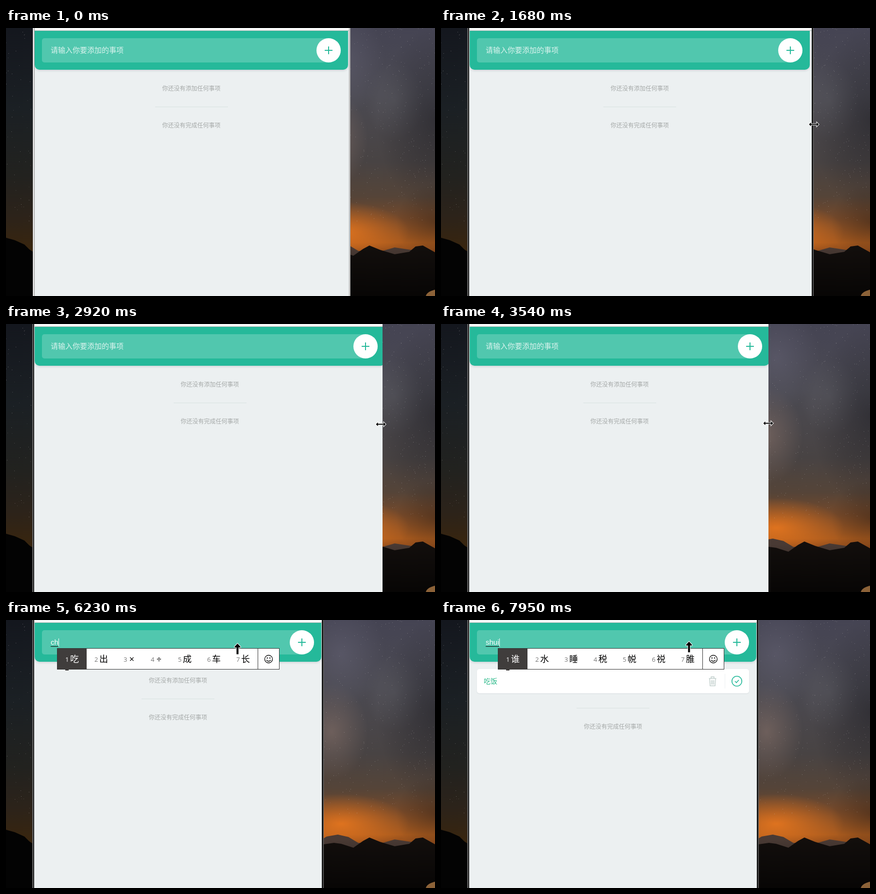
An HTML page with a canvas for the animation above (8 s loop, 883x552 px).

```html
<!DOCTYPE html>
<html lang="zh-CN">
<head>
<meta charset="utf-8">
<style>
html, body { margin: 0; width: 100%; height: 100%; overflow: hidden; background: #000; }
body { font-family: 'Liberation Sans', 'Noto Sans CJK SC', 'Noto Sans CJK', sans-serif; }
body *, #tail::after { position: absolute; box-sizing: border-box; }
svg * { position: static; }
svg { fill: none; overflow: visible; }
#left { left: 54px; top: 0; width: 5px; height: 552px; }
#right { top: 0; width: 4px; height: 552px; background: linear-gradient(90deg, #191919 3px, #727272 3px); }
.idle #right { background: linear-gradient(90deg, #999 1px, #f0f0f0 1px 2px, #8a8a8a 2px 3px, transparent 3px); }
#left { background: linear-gradient(90deg, #555 1px, #777 1px 2px, #191919 2px 4px, #ecf0f1 4px); }
.idle #left { background: linear-gradient(90deg, transparent 1px, #aaa 1px 2px, #f0f0f0 2px 4px, #8a8a8a 4px); }
#win { left: 59px; top: 0; height: 552px; overflow: hidden; background: #ecf0f1; }
#strip { left: 0; top: 0; width: 100%; height: 6px; background: #f6f7f7; border-bottom: 1px solid #9fb5af; }
#page { left: 0; top: 0; height: 552px; }
#head { top: 6px; width: 100%; height: 80px; background: #25b99a; border-radius: 0 0 10px 10px; box-shadow: 0 2px 4px rgba(44,62,80,.15); }
#field { left: 15px; right: 15px; top: 15px; height: 50px; border-radius: 5px 25px 25px 5px; background: rgba(255,255,255,.2); }
#add { right: 0; top: 0; width: 50px; height: 50px; border-radius: 50%; background: #fff; }
#hint, #typed { left: 18px; font-size: 15px; line-height: 50px; white-space: pre; color: #fff; }
#hint { opacity: .8; }
#line { left: 18px; top: 33px; height: 1px; background: #000; }
#caret { top: 17px; width: 1px; height: 17px; background: #fff; }
.note { width: 100%; text-align: center; font-size: 12px; line-height: 20px; color: #a5a9a8; }
#none { top: 115px; }
#tail { top: 162px; width: 100%; }
#tail::after { content: ''; left: 50%; top: 0; width: 150px; height: 1px; margin-left: -75px; background: #d8e1e0; }
#tail .note { top: 29px; }
#item { left: 15px; right: 15px; top: 101px; height: 50px; padding-left: 14px; border-radius: 5px; background: #fff; box-shadow: 0 1px 2px rgba(44,62,80,.1); font-size: 14px; line-height: 50px; color: #28b888; }
#item svg { right: 0; top: 0; }
#ime { top: 58px; height: 44px; display: flex; border: 1px solid #333; background: #fff; font-family: 'Open Sans', 'Noto Sans CJK SC', 'Noto Sans CJK', sans-serif; line-height: 43px; color: #000; }
#ime > * { position: relative; flex: none; height: 42px; }
#ime i { left: 16px; font: 13px/45px 'Open Sans', sans-serif; color: #777; }
#ime b { left: 26px; right: 16px; text-align: center; font-size: 18px; font-weight: 400; white-space: nowrap; }
#ime div:first-child, #ime div:first-child i { background: #403d3c; color: #fff; }
#ime svg { border-left: 1px solid #333; }
#cursor { left: 0; top: 0; }
</style>
</head>
<body>
<canvas id="sky" width="883" height="552" style="left:0;top:0"></canvas>
<div id="left"></div>
<div id="win">
  <div id="page">
    <div id="head">
      <div id="field">
        <span id="hint">请输入你要添加的事项</span><span id="typed"></span><div id="line"></div><div id="caret"></div>
        <div id="add"><svg width="50" height="50" stroke="#25b99a" stroke-width="2"><path d="M17 25h16M25 17v16"/></svg></div>
      </div>
    </div>
    <div id="none" class="note">你还没有添加任何事项</div>
    <div id="item">吃饭
      <svg width="100" height="50" stroke="#c0cecb" stroke-width="1.4">
        <path d="M17.5 19.5h15M22 19v-3h6v3M18.8 20l1 14.5h10.4l1-14.5M22.4 23v9M25 23v9M27.6 23v9"/>
        <path d="M50.5 10v30" stroke="#edf0f1" stroke-width="1"/>
        <g stroke="#25b99a" stroke-width="1.6"><circle cx="75" cy="25" r="10.2"/><path d="M71 25l3 3 5-5.5"/></g>
      </svg>
    </div>
    <div id="tail"><div class="note">你还没有完成任何事项</div></div>
  </div>
  <div id="strip"></div>
</div>
<div id="right"></div>
<div id="ime"></div>
<svg id="cursor" width="1" height="1"><path id="shape" fill="#000" stroke="#fff" stroke-width="2" paint-order="stroke"/></svg>
<script>
const $ = id => document.getElementById(id);

// [time, value...] points, joined by straight lines
const edgeKeys = [[0, 706], [1340, 706], [1360, 708], [2057, 832], [2530, 858], [2665, 858], [2909, 775], [3460, 684], [3700, 650]];
const innerKeys = [[0, 704], [1340, 704], [1360, 706], [2057, 826], [2530, 856], [2665, 856], [2909, 780], [3460, 687], [3700, 649]];
const cursorKeys = [
  [70, 246, 342], [430, 733, 215], [590, 708, 206], [820, 708, 208], [1060, 709, 197], [1340, 709, 197],
  [1360, 711, 196], [2057, 836, 200], [2200, 850, 201], [2530, 862, 203], [2665, 862, 203], [2909, 771, 206],
  [3460, 681, 205], [3700, 653, 203], [3850, 653, 203], [4220, 433, 64.5], [5140, 433, 64.5], [5240, 419, 64.5],
  [5455, 419, 64], [5700, 59, 40], [5800, 59, 40], [6239, 476, 59], [6800, 476, 59], [7085, 531, 54.5],
  [7150, 531, 54.5], [7240, 510, 54.5]];
const shapes = {
  arrow: 'M0 0V16.5L4 13L6.5 19L9 18L6.5 12H12Z',
  size: 'M-10 0L-6 -4V-1H6V-4L10 0L6 4V1H-6V4Z',
  up: 'M0 -11L6 -4.5V-3H2V11H-2V-3H-6V-4.5Z'
};
// [time, composed text, candidates]
const typing = [
  [0, ''], [4915, 'c'], [6000, 'c', '吃 从 才 次 出 成 车'], [6150, 'ch', '吃 出 × ÷ 成 车 长'],
  [6305, 'chi', '吃 持 尺 迟 池 赤 翅'], [6385, 'chif', '吃饭 吃法 吃 持 尺 迟 池'],
  [6465, 'chifa', '吃法 吃发 吃 持 尺 迟 池'], [6540, 'chifan', '吃饭 吃饭了 吃饭吗 痴饭 吃 尺 迟'],
  [6780, '吃饭'], [7160, ''], [7465, 's', '是 说 上 三 四 十 所'], [7545, 'sh', '是 上 说 谁 时 事 睡'],
  [7775, 'shu', '书 树 数 输 属 熟 叔'], [7930, 'shui', '谁 水 睡 税 帨 祱 脽']];

function at(keys, t) {
  const i = keys.findIndex(k => k[0] > t);
  if (i < 0) return keys[keys.length - 1].slice(1);
  if (!i) return keys[0].slice(1);
  const a = keys[i - 1], b = keys[i], p = (t - a[0]) / (b[0] - a[0]);
  return a.slice(1).map((v, n) => v + (b[n + 1] - v) * p);
}

function show(id, on) { $(id).style.visibility = on ? 'visible' : 'hidden'; }

const face = '<svg width="44" height="42" stroke="#000" stroke-width="1.3"><circle cx="21.5" cy="21.5" r="8"/>' +
  '<path d="M17 23.5q4.5 5 9 0"/><path d="M18.7 18v2.4M24.3 18v2.4" stroke-width="1.8"/></svg>';

function cell(word, i) {
  const width = /[×÷]/.test(word) ? 56 : 42 + 18 * word.length;
  return `<div style="width:${width}px"><i>${i + 1}</i><b>${word}</b></div>`;
}

let last;
function setTyping(state) {
  if (state === last) return;
  last = state;
  const [, text, words] = state;
  $('typed').textContent = text;
  const w = Math.round($('typed').getBoundingClientRect().width);
  show('hint', !text);
  $('line').style.width = (/[a-z]/.test(text) ? w : 0) + 'px';
  $('caret').style.left = 18 + w - (text ? 0 : 0) + 'px';
  $('ime').style.left = 89 + w + 'px';
  $('ime').innerHTML = words ? words.split(' ').map(cell).join('') + face : '';
  show('ime', words);
}

function draw(now) {
  const t = 1360 + Math.floor((now % 8000 - 1345) / 77.45) * 77.45;
  const edge = Math.round(at(edgeKeys, t)[0]), inner = Math.round(at(innerKeys, t)[0]);
  document.body.className = t < 1350 ? 'idle' : '';
  $('win').style.width = edge - 59 + 'px';
  $('page').style.width = inner - 59 + 'px';
  $('right').style.left = edge + 'px';
  show('right', inner <= edge);

  setTyping(typing.filter(s => s[0] <= t).pop() || typing[0]);
  show('caret', t > 4215 && t < 4755 || t > 4915);
  const added = t > 7080;
  show('item', added);
  show('none', !added);
  $('tail').style.top = added ? '181px' : '162px';

  const [x, y] = at(cursorKeys, t).map(Math.round);
  const kind = t < 560 ? 'arrow' : t < 3800 || x < 64 ? 'size' : y < 72 ? 'up' : 'arrow';
  $('shape').setAttribute('d', shapes[kind]);
  $('cursor').style.transform = `translate(${x + .5}px,${y + .5}px)`;
  show('cursor', t > 70);
  requestAnimationFrame(() => draw(performance.now()));
}

function paintSky() {
  const c = $('sky').getContext('2d');
  const fade = (x, w, stops) => {
    const g = c.createLinearGradient(0, 0, 0, 552);
    stops.forEach(([p, col]) => g.addColorStop(p, col));
    c.fillStyle = g;
    c.fillRect(x, 0, w, 552);
  };
  const glow = (x, y, rx, ry, rgb, a) => {
    c.save();
    c.translate(x, y);
    c.scale(rx, ry);
    const g = c.createRadialGradient(0, 0, 0, 0, 0, 1);
    g.addColorStop(0, `rgba(${rgb},${a})`);
    g.addColorStop(1, `rgba(${rgb},0)`);
    c.fillStyle = g;
    c.fillRect(-1, -1, 2, 2);
    c.restore();
  };
  const ridge = (col, ...p) => {
    c.fillStyle = col;
    c.beginPath();
    c.moveTo(p[0], 552);
    for (let i = 0; i < p.length; i += 2) c.lineTo(p[i], p[i + 1]);
    c.lineTo(p[p.length - 2], 552);
    c.fill();
  };
  fade(0, 60, [[0, '#14171e'], [.3, '#1b2024'], [.55, '#22221f'], [.7, '#2c231a'], [.82, '#38250f']]);
  fade(60, 823, [[0, '#454453'], [.25, '#4b4a52'], [.5, '#484343'], [.63, '#554438'], [.71, '#75492a'], [.8, '#a85a1e'], [.84, '#8d4a1b']]);
  glow(670, 230, 75, 100, '145,120,110', .5);
  glow(690, 70, 90, 110, '110,108,128', .4);
  glow(800, 150, 60, 80, '115,114,120', .3);
  glow(883, 190, 120, 190, '22,22,28', .45);
  glow(883, 400, 80, 80, '40,25,15', .4);
  glow(690, 420, 140, 62, '235,120,30', .85);

  let seed = 7;
  const rnd = () => (seed = seed * 16807 % 2147483647) / 2147483647;
  for (let i = 0; i < 420; i++) {
    const x = i < 50 ? rnd() * 54 : 650 + rnd() * 233;
    c.fillStyle = `rgba(205,200,200,${(.1 + rnd() * .35).toFixed(2)})`;
    c.fillRect(x | 0, rnd() * 400 | 0, 1, 1);
  }

  ridge('#493a34', 640, 458, 660, 446, 683, 442, 705, 447, 725, 459, 765, 462, 800, 452, 840, 458, 883, 470);
  ridge('#120e0c', 640, 464, 675, 459, 690, 461, 715, 469, 735, 455, 748, 448, 770, 457, 800, 466, 830, 461, 843, 450, 858, 448, 883, 462);
  fade(640, 243, [[.82, 'rgba(0,0,0,0)'], [1, 'rgba(0,0,0,.6)']]);
  ridge('#030303', 0, 432, 18, 437, 38, 446, 48, 456, 60, 464);
  c.fillStyle = '#8c6238';
  c.beginPath();
  c.ellipse(888, 554, 24, 15, 0, 0, 7);
  c.fill();
}

paintSky();
draw(performance.now());
</script>
</body>
</html>
```
